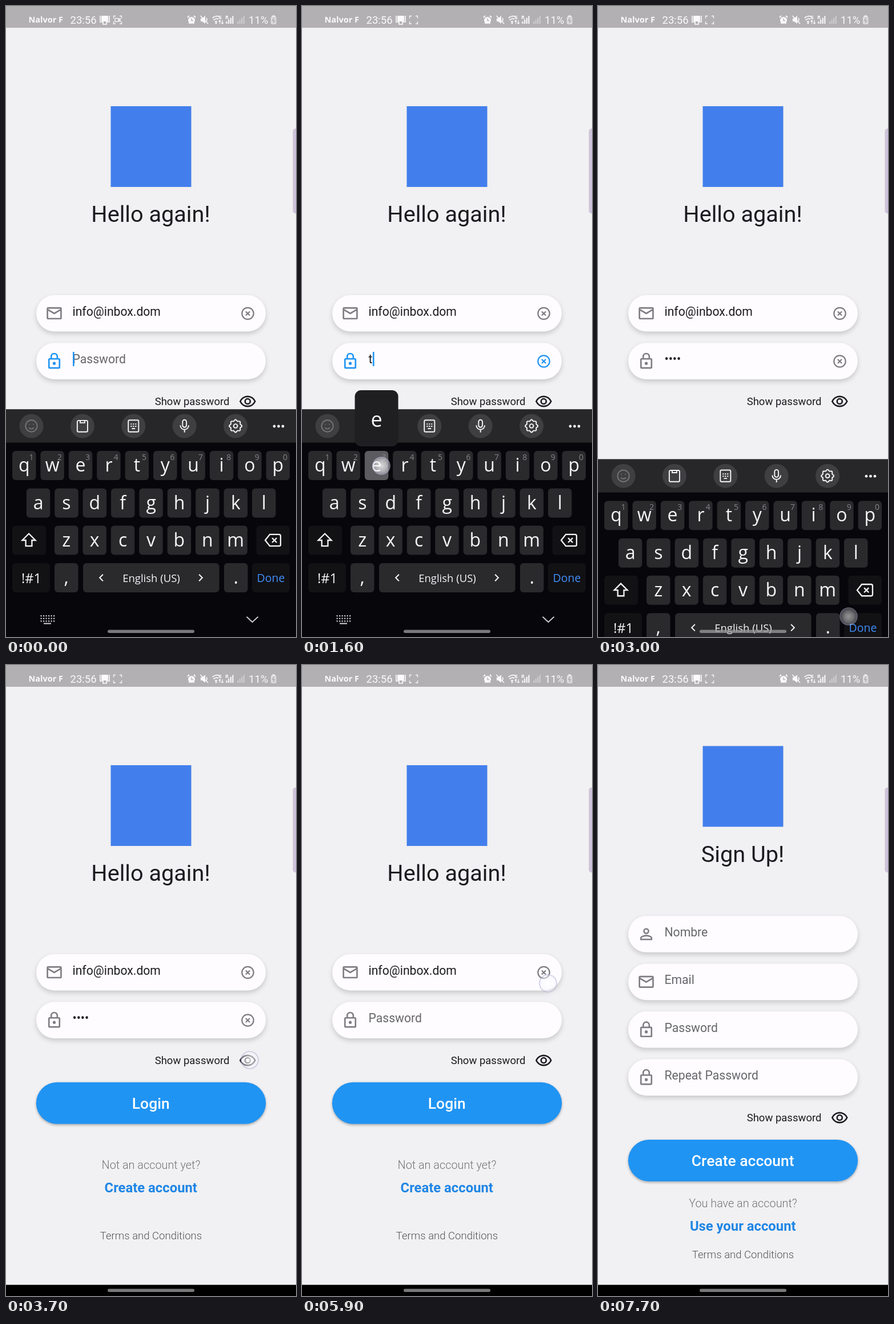
An HTML page with a canvas for the animation above (8000 ms loop, 508x1102 px).

```html
<!DOCTYPE html>
<html lang="en">
<head>
<meta charset="utf-8">
<style>
html, body { margin: 0; width: 100%; height: 100%; overflow: hidden; background: #f1f0f2; }
canvas { display: block; width: 508px; height: 1102px; }
</style>
</head>
<body>
<canvas id="stage" width="508" height="1102"></canvas>
<script>
const W = 508, H = 1102, LOOP = 8000, STEP = 100, DP = 1.323;
const ctx = document.getElementById('stage').getContext('2d');
const BG = '#f1f0f2', INK = '#1c1b1f', GREY = '#7f7d82', HINT = '#67666a';
const BLUE = '#2094f3', LINK = '#1e86e6', BRAND = '#437fec';
const APP = 'Roboto, sans-serif', KEYS = '"Open Sans", "Noto Sans", sans-serif';
const EMAIL = 'info@inbox.dom', SECRET = 'test';

// Icons are stroked on a 24-unit grid.
const ICON = {
  mail: 'M4 5H20a1 1 0 0 1 1 1V18a1 1 0 0 1-1 1H4a1 1 0 0 1-1-1V6a1 1 0 0 1 1-1zM3.2 7 12 12.2 20.8 7',
  lock: 'M6 9H18a1 1 0 0 1 1 1V20a1 1 0 0 1-1 1H6a1 1 0 0 1-1-1V10a1 1 0 0 1 1-1zM8 9V6a4 4 0 0 1 8 0V9M11 15a1 1 0 1 0 2 0 1 1 0 1 0-2 0z',
  person: 'M9 8a3 3 0 1 0 6 0 3 3 0 1 0-6 0zM5 19V17C5 15.5 9 14 12 14S19 15.5 19 17V19z',
  eye: 'M2.2 12C4 8 8 5.5 12 5.5S20 8 21.8 12C20 16 16 18.5 12 18.5S4 16 2.2 12zM8.6 12a3.4 3.4 0 1 0 6.8 0 3.4 3.4 0 1 0-6.8 0z',
  slash: 'M3.5 3.5 20.5 20.5',
  clear: 'M4.3 12a7.7 7.7 0 1 0 15.4 0 7.7 7.7 0 1 0-15.4 0zM9.3 9.3l5.4 5.4M14.7 9.3l-5.4 5.4',
  smile: 'M3 12a9 9 0 1 0 18 0 9 9 0 1 0-18 0zM8 14.5q4 4 8 0M9 9v1M15 9v1',
  clip: 'M6 3.5H18a2 2 0 0 1 2 2V19a2 2 0 0 1-2 2H6a2 2 0 0 1-2-2V5.5a2 2 0 0 1 2-2zM8.5 3.5V7H15.5V3.5',
  pad: 'M6 3H18a2 2 0 0 1 2 2V19a2 2 0 0 1-2 2H6a2 2 0 0 1-2-2V5a2 2 0 0 1 2-2zM7.5 9h2M11 9h2M14.5 9h2M7.5 12.5h2M11 12.5h2M14.5 12.5h2M9.5 16h5',
  mic: 'M12 2.5a3 3 0 0 1 3 3V11a3 3 0 0 1-6 0V5.5a3 3 0 0 1 3-3zM5.5 11a6.5 6.5 0 0 0 13 0M12 17.5V22',
  gear: gearPath(),
  shift: 'M12 3.5 20.5 12H16V19.5H8V12H3.5z',
  back: 'M8 4.5H20a2 2 0 0 1 2 2V17.5a2 2 0 0 1-2 2H8L2 12zM11 9l6 6M17 9l-6 6',
  down: 'M4 8.5 12 16 20 8.5',
  left: 'M15 6 9 12 15 18',
  right: 'M9 6 15 12 9 18'
};

// Touches: start, end, x, y, key, strength
const TAPS = [
  [1100, 1300, 232, 803, 't'], [1500, 1700, 139, 803, 'e'],
  [1700, 1900, 116, 872, 's'], [2100, 2300, 232, 803, 't'],
  [2800, 3100, 439, 1066, '', .7], [3700, 3900, 427, 690], [4300, 4500, 427, 690],
  [5000, 5200, 442, 631], [5800, 6000, 431, 556], [6800, 7100, 316, 907, '', .6]
];
const COMMITS = [1300, 1700, 1900, 2300];
const BLUR = 2900, REVEAL = [3900, 4500], CLEAR_PASS = 5200, CLEAR_MAIL = 6000;

function gearPath() {
  let d = '';
  for (let i = 0; i < 48; i++) {
    const a = i / 48 * Math.PI * 2, r = 8.8 + Math.cos(a * 8);
    d += `${i ? 'L' : 'M'}${12 + r * Math.cos(a)} ${12 + r * Math.sin(a)}`;
  }
  return d + 'zM9 12a3 3 0 1 0 6 0 3 3 0 1 0-6 0z';
}

const clamp = v => Math.max(0, Math.min(1, v));
const smooth = v => { v = clamp(v); return v * v * (3 - 2 * v); };

function box(x, y, w, h, r, color) {
  ctx.fillStyle = color;
  ctx.beginPath();
  ctx.roundRect(x, y, w, h, r);
  ctx.fill();
}

function dot(x, y, r, color) {
  ctx.fillStyle = color;
  ctx.beginPath();
  ctx.arc(x, y, r, 0, 7);
  ctx.fill();
}

function text(s, x, y, size, color, { weight = 400, family = APP, align = 'center' } = {}) {
  ctx.font = `${weight} ${size}px ${family}`;
  ctx.textAlign = align;
  ctx.fillStyle = color;
  ctx.fillText(s, x, y);
}

function icon(name, x, y, color, scale = DP, width = 2) {
  ctx.save();
  ctx.translate(x, y);
  ctx.scale(scale, scale);
  ctx.translate(-12, -12);
  ctx.strokeStyle = color;
  ctx.lineWidth = width;
  ctx.stroke(new Path2D(ICON[name]));
  ctx.restore();
}

function shadowBox(x, y, w, h, r, color, shade, blur, drop) {
  ctx.save();
  ctx.shadowColor = shade;
  ctx.shadowBlur = blur;
  ctx.shadowOffsetY = drop;
  box(x, y, w, h, r, color);
  ctx.restore();
}

function field(y, glyph, hint, value = '', focused = false, caret = false) {
  const tint = focused ? BLUE : GREY;
  shadowBox(53, y, 402, 63.5, 32, '#fefcff', 'rgba(0,0,0,.17)', 9, 4);
  icon(glyph, 84.5, y + 31.7, tint);
  text(value || hint, 116.5, y + 35.7, 16 * DP, value ? INK : HINT, { align: 'left' });
  if (value) icon('clear', 423.5, y + 32, tint, DP, 1.7);
  if (caret) {
    const end = value ? ctx.measureText(value).width : 0;
    ctx.fillStyle = BLUE;
    ctx.fillRect(117 + end, y + 15.5, 2.6, 25);
  }
}

function brand(y) {
  ctx.fillStyle = BRAND;
  ctx.fillRect(183.5, y, 141, 141);
}

function showPassword(y, revealed) {
  text('Show password', 391.5, y + 6.5, 14 * DP, INK, { align: 'right' });
  icon('eye', 423.3, y, INK);
  if (revealed) icon('slash', 423.3, y, INK);
}

function footer(y, label, question, link, linkY, termsY) {
  shadowBox(52.8, y, 402.4, 72.7, 36.4, BLUE, 'rgba(0,0,0,.3)', 4, 2);
  text(label, 253.7, y + 46.3, 20 * DP, '#fff', { weight: 500 });
  text(question, 254, linkY - 41, 15 * DP, '#747377', { weight: 300 });
  text(link, 253.7, linkY, 18 * DP, LINK, { weight: 700 });
  text('Terms and Conditions', 254, termsY, 14 * DP, '#545357', { weight: 300 });
}

function passwordText(t) {
  if (t >= CLEAR_PASS) return '';
  const n = COMMITS.filter(c => t >= c).length;
  if (t >= REVEAL[0] && t < REVEAL[1]) return SECRET;
  if (t >= BLUR || !n) return '•'.repeat(n);
  return '•'.repeat(n - 1) + SECRET[n - 1];
}

function loginPage(t) {
  const focused = t < BLUR;
  const caret = focused && (t >= 1100 || t < 300 || t >= 700);
  brand(175);
  text('Hello again!', 253.5, 377, 30 * DP, INK);
  field(505, 'mail', 'Email', t < CLEAR_MAIL ? EMAIL : '');
  field(588.5, 'lock', 'Password', passwordText(t), focused, caret);
  showPassword(690.5, t >= REVEAL[0] && t < REVEAL[1]);
  if (t >= 3100) footer(728.8, 'Login', 'Not an account yet?', 'Create account', 921, 1002.5);
}

function signUpPage() {
  brand(141.5);
  text('Sign Up!', 253.5, 344, 30 * DP, INK);
  [['person', 'Nombre'], ['mail', 'Email'], ['lock', 'Password'], ['lock', 'Repeat Password']]
    .forEach(([glyph, hint], i) => field(438.3 + 83.4 * i, glyph, hint));
  showPassword(790.5, false);
  footer(829, 'Create account', 'You have an account?', 'Use your account', 988, 1036);
}

function page(draw, scale, alpha) {
  ctx.save();
  ctx.globalAlpha = alpha;
  ctx.translate(W / 2, H / 2);
  ctx.scale(scale, scale);
  ctx.translate(-W / 2, -H / 2);
  ctx.fillStyle = BG;
  ctx.fillRect(0, 0, W, H);
  draw();
  ctx.restore();
}

function key(x, y, w, label, pressed, color = '#2a292c') {
  box(x, y, w, 51, 6, pressed ? '#5c5b5f' : color);
  if (label) text(label, x + w / 2, y + 36, 32, '#f6f5f7', { family: KEYS });
}

function popup(x, y, label) {
  box(x - 38, y - 106, 76, 98, 11, '#1f1e21');
  text(label, x, y - 42, 36, '#f6f5f7', { family: KEYS });
}

function keyboard(active) {
  const white = '#f6f5f7', func = '#121114', pitch = 49.4, kw = 41.5;
  ctx.fillStyle = '#07060a';
  ctx.fillRect(0, 704.5, W, 420);
  ctx.fillStyle = '#272629';
  ctx.fillRect(0, 704.5, W, 58);
  ['smile', 'clip', 'pad', 'mic', 'gear'].forEach((name, i) => {
    const x = 44.5 + 89.4 * i;
    dot(x, 733.5, 21, '#3f3e41');
    icon(name, x, 733.5, i ? white : '#747376', 1.13, 1.7);
  });
  for (const x of [470, 477.5, 485]) dot(x, 734, 2.4, white);

  let bubble;
  [['qwertyuiop', 11, 777], ['asdfghjkl', 35.8, 842.5], ['zxcvbnm', 85, 907.5]].forEach(([row, left, y], r) => {
    [...row].forEach((ch, i) => {
      const x = left + pitch * i;
      key(x, y, kw, ch, ch === active);
      if (!r) text((i + 1) % 10, x + 33.5, y + 16, 14, '#858488', { family: KEYS });
      if (ch === active) bubble = [x + kw / 2, y, ch];
    });
  });
  key(11, 907.5, 59, '', false, func);
  icon('shift', 40, 933, white, 1.35, 1.7);
  key(438.5, 907.5, 58.5, '', false, func);
  icon('back', 467.5, 933, white, 1.35, 1.7);
  key(11, 973, 66, '', false, func);
  text('!#1', 44.5, 1007.5, 23.5, white, { family: KEYS });
  key(85, 973, kw, ',');
  key(135, 973, 238.5, '');
  text('English (US)', 254.5, 1005.5, 18.5, white, { family: KEYS });
  icon('left', 167, 998.5, white, .95, 2.1);
  icon('right', 341, 998.5, white, .95, 2.1);
  key(382, 973, kw, '.');
  key(431, 973, 66, '', false, func);
  text('Done', 464, 1006, 19.5, '#3f8ef7', { family: KEYS });

  for (let r = 0; r < 3; r++)
    for (let i = 0; i < 6; i++) {
      ctx.fillStyle = '#d2d1d4';
      ctx.fillRect(60.5 + 4.5 * i, 1064 + 4.6 * r, 2.2, 2.2);
    }
  ctx.fillRect(66, 1077.5, 13, 2);
  icon('down', 431.5, 1071, '#d2d1d4', 1.25, 1.6);
  if (bubble) popup(...bubble);
}

function strokes(d, width = 1.7, color = '#fafafa') {
  ctx.strokeStyle = color;
  ctx.lineWidth = width;
  ctx.stroke(new Path2D(d));
}

function bars(x, color) {
  ctx.fillStyle = color;
  for (let i = 0; i < 4; i++) ctx.fillRect(x + 3.6 * i, 27 - 3.2 * i, 2.1, 4 + 3.2 * i);
}

function statusBar(recording) {
  const white = '#fafafa', left = { align: 'left' };
  ctx.fillStyle = '#b3b0b3';
  ctx.fillRect(0, 0, W, 38);
  text('Nalvor F', 39.5, 29, 14.5, white, { family: KEYS, align: 'left', weight: 700 });
  text('23:56', 112.5, 30.5, 18.5, white, left);
  box(167, 17, 12, 10, 1, white);
  strokes('M165 17V28H169M181 17V28H177M170 24V32H176V24');
  strokes('M192 17.5H188.5V21.5M199 17.5H202.5V21.5M188.5 27V31H192M202.5 27V31H199', 1.3);
  if (recording) strokes('M191 21.7H197V27.3H191zM197 24.5L200 22V27z', 1.3);

  // Alarm, mute, wireless
  dot(325, 25, 6, white);
  strokes('M318 20L321 17M332 20L329 17M320.5 31L322 29M329.5 31L328 29', 1.9);
  strokes('M325 21.5V25.5H328', 1.4, '#b3b0b3');
  ctx.fillStyle = white;
  ctx.fill(new Path2D('M341 21.5H344L349 17V31L344 27H341z'));
  strokes('M340.5 17L354 31');
  strokes('M351 21Q353 24 351 27', 1.5);
  strokes('M361.5 21Q368 15.5 374 19M363.5 24.5Q368 20.5 372 23M366 28Q368 26 370 28');
  dot(368, 30, 1.5, white);
  const tiny = { family: KEYS, weight: 700 };
  text('6', 375, 23, 9, white, tiny);
  strokes('M374.5 31V25.5M372.8 27L374.5 25L376.2 27M379 25V30.5M377.3 29L379 31L380.7 29', 1.2);
  text('R', 387, 23, 9, white, tiny);
  bars(385.5, white);
  bars(405, '#cfcdcf');
  text('11%', 425, 30.5, 18.5, white, left);
  box(464, 18, 9.5, 14, 2, '#dddcdd');
  box(466.5, 16.5, 4.5, 2, 0, white);
  strokes('M469.5 20L467 25.5H470.5L468 30', 1.4, '#aaa8aa');
}

function touch([, , x, y, , strength = 1]) {
  const glow = ctx.createRadialGradient(x, y, 0, x, y, 16);
  glow.addColorStop(0, 'rgba(255,255,255,.78)');
  glow.addColorStop(.55, 'rgba(250,250,255,.58)');
  glow.addColorStop(1, 'rgba(240,240,250,.3)');
  ctx.save();
  ctx.globalAlpha = strength;
  dot(x, y, 15.5, glow);
  ctx.strokeStyle = 'rgba(165,165,205,.5)';
  ctx.lineWidth = 1.6;
  ctx.beginPath();
  ctx.arc(x, y, 15, 0, 7);
  ctx.stroke();
  ctx.restore();
}

function draw(t) {
  const enter = 1 - (1 - clamp((t - 7050) / 350)) ** 2;
  const taps = TAPS.filter(([from, to]) => t >= from && t < to);
  if (enter < 1) page(() => loginPage(t), 1 + .05 * enter, 1);
  if (enter > 0) page(signUpPage, .85 + .15 * enter, clamp(enter * 1.3));

  ctx.fillStyle = '#000';
  ctx.fillRect(0, 1082.5, W, 20);
  const slide = smooth((t - 2870) / 430);
  if (slide < 1) {
    ctx.save();
    ctx.translate(0, 398 * slide);
    keyboard(taps.length ? taps[0][4] : '');
    ctx.restore();
  }
  box(178, 1089.5, 152, 5.5, 2.75, 'rgba(150,149,152,.8)');
  const beat = t % 1000;
  statusBar(t < 600 || (beat >= 100 && beat < 600));
  box(502.5, 214, 12, 148.5, 5, '#cdc3da');
  taps.forEach(touch);
}

function tick() {
  const t = performance.now() % LOOP;
  draw(Math.floor(t / STEP) * STEP);
  requestAnimationFrame(tick);
}
tick();
</script>
</body>
</html>
```
